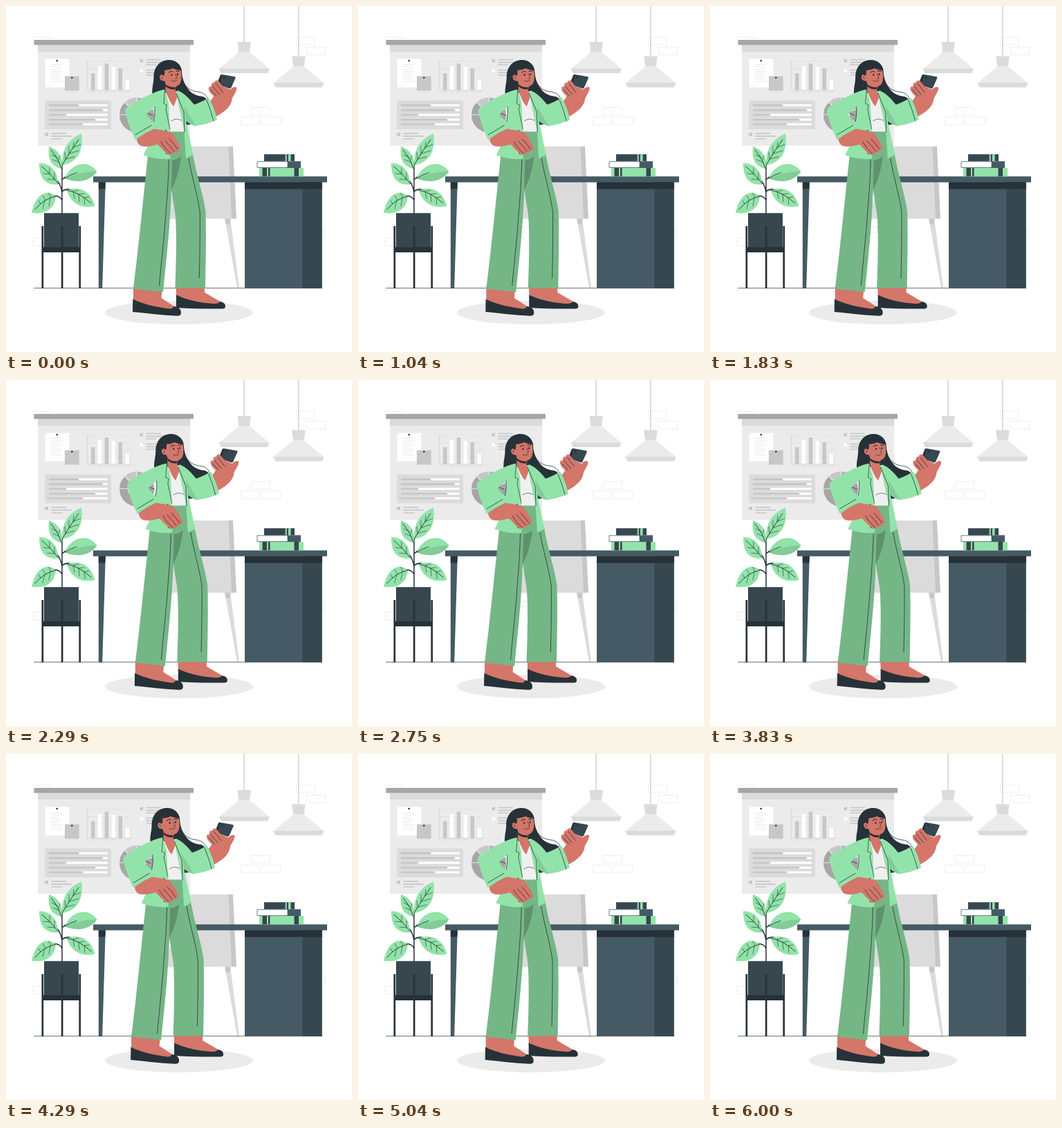
Write an HTML page that moves like this. It is 500 by 500 pixels and loops after 6.04 s.

```html
<!DOCTYPE html>
<html lang="en">
<head>
<meta charset="utf-8">
<title>Office selfie</title>
<style>
html, body { margin: 0; width: 100%; height: 100%; overflow: hidden; background: #fff; }
svg { display: block; width: 100%; height: 100%; }
.g1 { fill: #ebebeb } .g2 { fill: #dbdbdb } .g3 { fill: #c7c7c7 } .g4 { fill: #a6a6a6 }
.w { fill: #fff }
.ink { fill: #263238 } .navy { fill: #37474f } .slate { fill: #455a64 }
.mint { fill: #92e3a9 } .fern { fill: #83cc98 } .sage { fill: #75b687 } .moss { fill: #5e926c }
.skin { fill: #d4766a }
.line { fill: none; stroke: #263238; stroke-width: .8; stroke-linecap: round; stroke-linejoin: round }
.brick { fill: none; stroke: #ebebeb; stroke-width: .8 }
.pale { fill: none; stroke: #dbdbdb; stroke-width: .6 }
.text { fill: none; stroke: #c7c7c7; stroke-width: 1.7 }
</style>
</head>
<body>
<svg viewBox="0 0 500 500">
  <defs>
    <g id="lamp">
      <path class="g3" d="M343.5 -30h1.2v84h-1.2z"/>
      <path class="g2" d="M334.5 52h19.500l-2.500 19h-14.500z"/>
      <path class="g1" d="M337 66.500h14.500L381 91H307.500z"/>
      <path class="g2" d="M307.500 90.500H381l-3 6.500H311z"/>
    </g>
  </defs>

  <path class="brick" d="M39 45h27v11H39zM419.500 45h27v11h-27zM434.500 59.500h27v11h-27zM354.500 146.500h27v11h-27zM339.500 160.500h27v11h-27zM369.500 160.500h27v11h-27zM39 335.500h27v11H39zM434.500 321.500h27v11h-27zM222 308.500h27v11h-27zM215 319.500h27v8h-27z"/>

  <!-- Presentation board -->
  <path class="g1" d="M46 56h220v146H46z"/>
  <path class="g2" d="M46 56h220v10H46z"/>
  <path class="g4" d="M40.500 49H271v7.200H40.500z"/>
  <path class="w" d="M56.500 76.500h34.700v41H56.500z"/>
  <path class="pale" d="M65 84.500h15M65 88h17M65 91.500h12M65 95h16M65 98.500h14M65 102h17M65 105.500h13M65 109h16"/>
  <path class="g3" d="M85 101.500h20.700v21H85z"/>
  <circle class="ink" cx="73.700" cy="79" r="1.300"/>
  <circle class="ink" cx="95.300" cy="103.500" r="1.300"/>
  <path class="pale" d="M118 80h64M118 90.500h64M118 101h64M118 111.500h64"/>
  <path class="g3" d="M123 97h5.500v24.500h-5.500zM142.700 83h5.500v38.500h-5.500zM162.500 90h5.500v31.500h-5.500z"/>
  <path class="w" d="M132.800 87h5.500v34.500h-5.500zM152.600 88h5.500v33.500h-5.500zM172.500 107h5.500v14.500h-5.500z"/>
  <path d="M117.700 79v42.600H182M122 124h7M132 124h7M142 124h7M152 124h7M162 124h7M172 124h7" fill="none" stroke="#c7c7c7" stroke-width=".6"/>
  <path class="g2" d="M56.500 136.500H152v41.500H56.500z"/>
  <path class="w" d="M61.800 142h85v3h-85zM61.800 149h85v3h-85zM61.800 155.800h85v3h-85zM61.800 162.700h85v3h-85zM61.800 169.600h85v3h-85z"/>
  <path class="g3" d="M61.800 142H105v3H61.800zM61.800 149h78v3h-78zM61.800 155.800H87v3H61.800zM61.800 162.700H129v3H61.800zM61.800 169.600H111v3H61.800z"/>
  <path class="g3" d="M56.300 183h4.700v4.700h-4.700zM193.500 76.700h4.500v4.500h-4.500z"/>
  <path class="w" d="M193.500 91.500h4.500v4.500h-4.500z"/>
  <path class="text" d="M65.500 184.200H87M65.500 188.200h29.500M65.500 192H81M202.500 77.500H224M202.500 81.300h29M202.500 85H217M202.500 92.500H224M202.500 96.300h29M202.500 100H217"/>
  <g fill="none" stroke-width="12">
    <circle cx="189" cy="157.500" r="19" stroke="#a6a6a6"/>
    <path d="M176 143.500A19 19 0 0 1 189 138.500" stroke="#c7c7c7"/>
    <path d="M189 138.500A19 19 0 0 1 207 152" stroke="#b5b5b5"/>
    <path d="M189 132v13M163 157h14M171 138l9 10M203 152l11-4" stroke="#ebebeb" stroke-width="1.200"/>
  </g>

  <use href="#lamp"/>
  <use href="#lamp" x="78.700" y="20.600"/>

  <!-- Chair -->
  <path class="g2" d="M316 306h8l13 101h-3z"/>
  <path class="g3" d="M316 306h9l-1.500 9.500h-6z"/>
  <path class="g2" d="M262 203h60l4.500 104.500H228z"/>
  <path class="g3" d="M321.500 203h6.500l5 104.500h-7z"/>

  <!-- Desk -->
  <path class="slate" d="M126 246.300h338v8.500H126z"/>
  <path class="slate" d="M133.800 254h10l-4.600 154h-5.400z"/>
  <path class="ink" d="M133.800 254.800h10l-.4 9.500h-9.600z"/>
  <path d="M40 407.700H457" stroke="#263238" stroke-width=".7"/>
  <path class="slate" d="M345 254h84v154h-84z"/>
  <path class="navy" d="M428.500 254h28.300v154h-28.300z"/>
  <path class="ink" d="M345 254.800h111.800v9.800H345z"/>

  <!-- Books -->
  <path class="mint" d="M366 234h64v12.300h-64z"/>
  <path class="navy" d="M370.500 234h6.500v12.300h-6.500zM379 234h2.500v12.300h-2.500zM416.500 234h6.500v12.300h-6.500z"/>
  <path class="slate" d="M404 224.300h22V234h-22z"/>
  <path d="M363 224.800h44v8.700h-44z" fill="#fff" stroke="#455a64" stroke-width=".8"/>
  <path class="navy" d="M373 214.300h44v10h-44z"/>
  <path class="mint" d="M403.700 214.300h2v10h-2zM408 214.300h3.500v10H408z"/>

  <!-- Plant -->
  <path class="line" style="stroke-width:1.500" d="M81 300V226M81 281Q79 275 70 274M81 268Q87 263 97 266M81 270Q79 254 68 246M81 251Q88 244 100 241"/>
  <path class="mint" d="M81 230C80 208 90 192 109 184.500C112 206 106 226 81 230zM80.500 235C63 232 60.500 218 62 203C76 207 83 220 80.500 235zM75 258C55 259 48 247 48 227C64 227 76 239 75 258zM85 249C92 230 116 219 131.500 239C121 255 100 256 85 249zM72 275C63 266 44 267 37 299C55 301 70 296 72 275zM88 266C100 261 122 263 128.500 289C109 294 93 285 88 266z"/>
  <path class="fern" d="M85 249C100 243 115 239 131.500 239C121 255 100 256 85 249z"/>
  <path class="line" style="stroke-width:.9" d="M81 230Q91 213 105 193M80 235Q75 219 65 208M76 257Q64 242 52 232M85 249Q92 244 102 241M72 275Q55 278 42 294M88 266Q105 269 123 285"/>
  <path class="line" style="stroke-width:.6" d="M86 222l-1-10M91 214v-11M97 205l1-9M87 221l12-3M92 213l13-4M98 204l10-4M77 226l-9-4M74 219l-8-4M76 223l2-7M70 251l-10-1M64 243l-10-1M70 250v-9M63 242v-8M65 276l-4-6M57 280l-4-6M50 286l-3-5M64 277l-2 12M56 281l-3 12M97 268l8-2M105 272l8-1M113 277l7-1M97 268l2 10M105 272l1 11M113 278l1 9"/>
  <path class="navy" d="M55 299.300h50V349H55z"/>
  <path class="ink" d="M51.500 348.500H108v7.500H51.500zM51.500 318h2.700v90h-2.700zM79.800 318h2.700v90h-2.700zM105.400 318h2.700v90h-2.700z"/>

  <ellipse class="g1" cx="250" cy="443" rx="107" ry="17"/>

  <g id="woman">
    <!-- Feet -->
    <path class="skin" d="M184 405L225.500 410L224.500 422L243 434L240 440L184 436zM245.500 404H287V414L309.500 427L306 433L246.500 430z"/>
    <path class="ink" d="M183.300 423.500C198 431 217 435 236 437.500C240 437.800 242 436 242.300 434C248 434.500 253 437 253 443C253 446.500 251 448 247 447.800C224 446.500 203 444 183 442zM246 417.500C260 424.500 280 429 300 430.200C305 430.400 308 429 309.500 427C314 428 317 430 317 434C317 436.700 315.500 437.500 312 437.500C290 437.700 268 437.500 246 436z"/>

    <!-- Trousers -->
    <path class="sage" d="M236 180H258L270 214C275 243 285 272 288.500 297C289.500 340 288.500 375 288 407.500H244.500C246 370 247 325 244.500 300L239 266C237 320 232 365 227 413.500L184 408.500C192 345 198 280 205 216z"/>
    <path class="moss" d="M240 223C246 222 250 220 253 217C251 235 247 250 239 266z"/>
    <path class="line" d="M235.500 222C234.500 260 232 285 230 312C227.500 345 224 375 221.500 404M264 220C268 245 277 273 280.300 298C280.500 335 280 365 279.300 393"/>

    <!-- Hair behind -->
    <path class="ink" d="M236 78C222 78 214 88 213.500 102C213.500 112 210.500 118 211.500 128L234 130L250 140L260 172L267 171L288 146C293 139 291 133 285 131C277 130 270 128 264 121C257 112 254.500 104 254 94C252 83 245 78 236 78z"/>
    <path class="line" d="M255 107C260 119 268 123 277 124C287 125 291 130 292 137"/>

    <!-- Top and neck -->
    <path fill="#f0f0f0" d="M230 126L248 123L257 151L258 181.500H236z"/>
    <path class="skin" d="M230.500 109L246 115L244.500 121L247.500 132L242.500 145C238 141 234 132 230.500 122z"/>
    <path class="ink" d="M230.500 113Q236 118 245 117.500L244 120.500Q236 121 230.500 116z"/>
    <path class="line" style="stroke-width:.6" d="M239 166Q246 162 250 164Q254 166 257 165"/>

    <!-- Face -->
    <path class="skin" d="M226 90H252C254 98 254.500 107 251.500 112C248.500 117 241 118 235 115C231 113 229.500 110.500 229 108C225 109 222 106 222 102C222 98.500 225 97 228 100z"/>
    <path class="ink" d="M218 104C217 90 225 81 237 80C247 80 253 86 254 93C248 93 244 91.500 241 90C237 92 233 92.500 229 93C229.500 97 229 100 227.500 101C225 98 222 99 222 103L221 110z"/>
    <ellipse class="ink" cx="239.400" cy="99.500" rx="1.100" ry="1.600"/>
    <ellipse class="ink" cx="248" cy="98.500" rx="1.100" ry="1.600"/>
    <path class="line" style="stroke-width:1.100" d="M235.500 96Q238 93.500 241 95M246 94.500Q248.500 93 250.500 94.500"/>
    <path class="line" style="stroke-width:.7" d="M244.500 98L247.500 104Q246.500 105.500 244.500 105M239 108Q243 110.500 247 107.500M224.500 102Q226.500 102 226 105"/>

    <!-- Right arm, hand and phone -->
    <path class="skin" d="M295 138C298 134 300 132 300 130C295 126 292 121 293 118C294 116 296 116 297 117C296 113 298 110 301 111L314 116L324 121C326 118.500 330 116 333 117.500C335 120 330 128 327 133C326 144 318 152 303 160z"/>
    <path class="navy" d="M310 100Q311 98.500 313 99L330 102Q332.300 102.500 331.500 104.500L325.500 118Q324.500 120 322.500 119.300L306 113z"/>
    <path class="ink" d="M310 99.500L306.500 108L309 112L312.500 99z"/>
    <circle class="ink" cx="315.500" cy="103" r="1.500"/>
    <path class="skin" d="M301 111C301.500 107.500 305 106.500 307.500 109L314.500 118L321 121.500L326 124L314 132L302 122z"/>
    <path class="line" d="M303.500 112L313.500 125M298.500 116L308.500 128M296 121L304 130"/>

    <!-- Jacket -->
    <path class="mint" d="M248 122C258 126 266 135 272 142.500C279 140 287 136 293.500 132.500C299 143 303 154 305 164.500C295 169 284 172 274 173.500C268 172 264 169 260 166L270.500 215L260 220.500L257.500 181L246 126z"/>
    <path class="fern" d="M257 144C263 154 269 164 274 173.500C268 172 264 169 260 166z"/>
    <path class="line" d="M290 136Q296 150 300 166M246 126L257 153L258 182"/>
    <path class="mint" fill-rule="evenodd" d="M229.500 120.500C212 124 195 134 177 145C172.500 148 171.500 151 173 156C177 170 181 182 187 193.500L214 179C211 188 204 205 198.500 215.500C211 220 224 222 237.500 221L237 181L235 140zM215 146C211 148 207 152 203 157C206 161 210 165 213.500 167C215 160 216 152 215 146z"/>
    <path class="line" d="M187 186L210 172.500M205 155L212 158M215 146Q216 156 213.500 167"/>
    <path class="line" style="stroke-width:.7" d="M229.500 121L228 141L232.500 143L231 149L237 178"/>
    <circle class="ink" cx="231" cy="180" r=".9"/>
    <circle class="ink" cx="232" cy="213" r="1"/>

    <!-- Hand on the hip -->
    <path class="skin" d="M189 192C197 186 206 181 214 177.500C222 179 231 180 238 182C244 187 248 195 252 204C253 208 250 209 248 207C249 211 246 213 243 210C244 214 241 216 238 213C237 216 234 216 232 213C227 208 223 204 219 200C210 203 200 204 195 202C191 200 189 196 189 192z"/>
    <path class="line" d="M236 192Q243 199 248 207M230 195Q238 203 243 210M224 196Q230 207 238 213"/>
  </g>
</svg>
<script>
const woman = document.getElementById("woman");
const LOOP = 6040, SHAKE = 6000, LEAD = 20;
// Horizontal offset at each tenth of the shake
const offsets = [0, -1, 2, -4, 4, -4, 4, -4, 2, -1, 0];

function shift(t) {
  const p = Math.min((t % LOOP + LEAD) / SHAKE, 1) * 10;
  const i = Math.min(Math.floor(p), 9);
  return offsets[i] + (offsets[i + 1] - offsets[i]) * (p - i);
}

function draw() {
  woman.setAttribute("transform", `translate(${shift(performance.now()).toFixed(3)} 0)`);
  requestAnimationFrame(draw);
}
draw();
</script>
</body>
</html>
```
